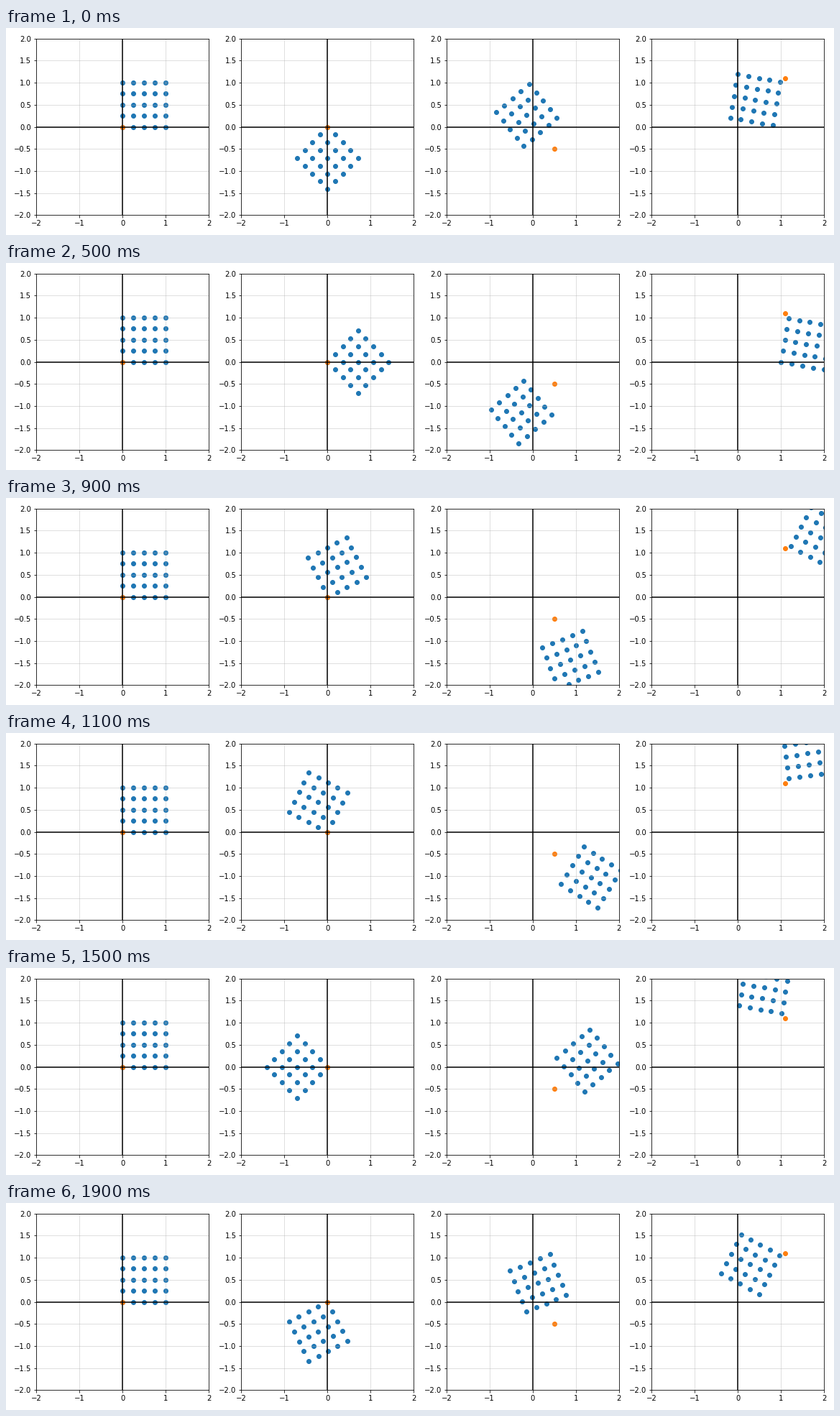
Animation of 1152x288 px, one loop 2 s. Source, as a matplotlib script:

```python
import numpy as np
import matplotlib.pyplot as plt
from matplotlib.animation import FuncAnimation

FRAMES = 20
STEP = 360 / FRAMES

# (pivot, start angle in degrees, degrees per frame)
PANELS = [
    ((0.0, 0.0), 0, 0),
    ((0.0, 0.0), -135, STEP),
    ((0.5, -0.5), 40, STEP),
    ((1.1, 1.1), -10, STEP),
]

side = np.linspace(0, 1, 5)
GRID = np.array([(x, y) for x in side for y in side])


def rotate(points, pivot, degrees):
    a = np.radians(degrees)
    turn = np.array([[np.cos(a), -np.sin(a)], [np.sin(a), np.cos(a)]])
    return (points - pivot) @ turn.T + pivot


def setup(ax, pivot):
    ax.set_xlim(-2, 2)
    ax.set_ylim(-2, 2)
    ax.set_xticks(np.arange(-2, 3))
    ax.set_yticks(np.arange(-2, 2.5, 0.5))
    ax.grid(alpha=0.5)
    ax.axhline(0, color="black")
    ax.axvline(0, color="black")
    dots = ax.scatter(*GRID.T, color="tab:blue")
    ax.scatter(*pivot, color="tab:orange")
    return dots


plt.rcParams["font.family"] = "DejaVu Sans"
fig, axes = plt.subplots(1, 4, figsize=(16, 4), dpi=72)
clouds = [setup(ax, pivot) for ax, (pivot, _, _) in zip(axes, PANELS)]
fig.tight_layout()


def update(i):
    for dots, (pivot, start, speed) in zip(clouds, PANELS):
        dots.set_offsets(rotate(GRID, pivot, start + speed * i))
    return clouds


anim = FuncAnimation(fig, update, frames=FRAMES, interval=100,
                     repeat=True, repeat_delay=0)
plt.show()
```
